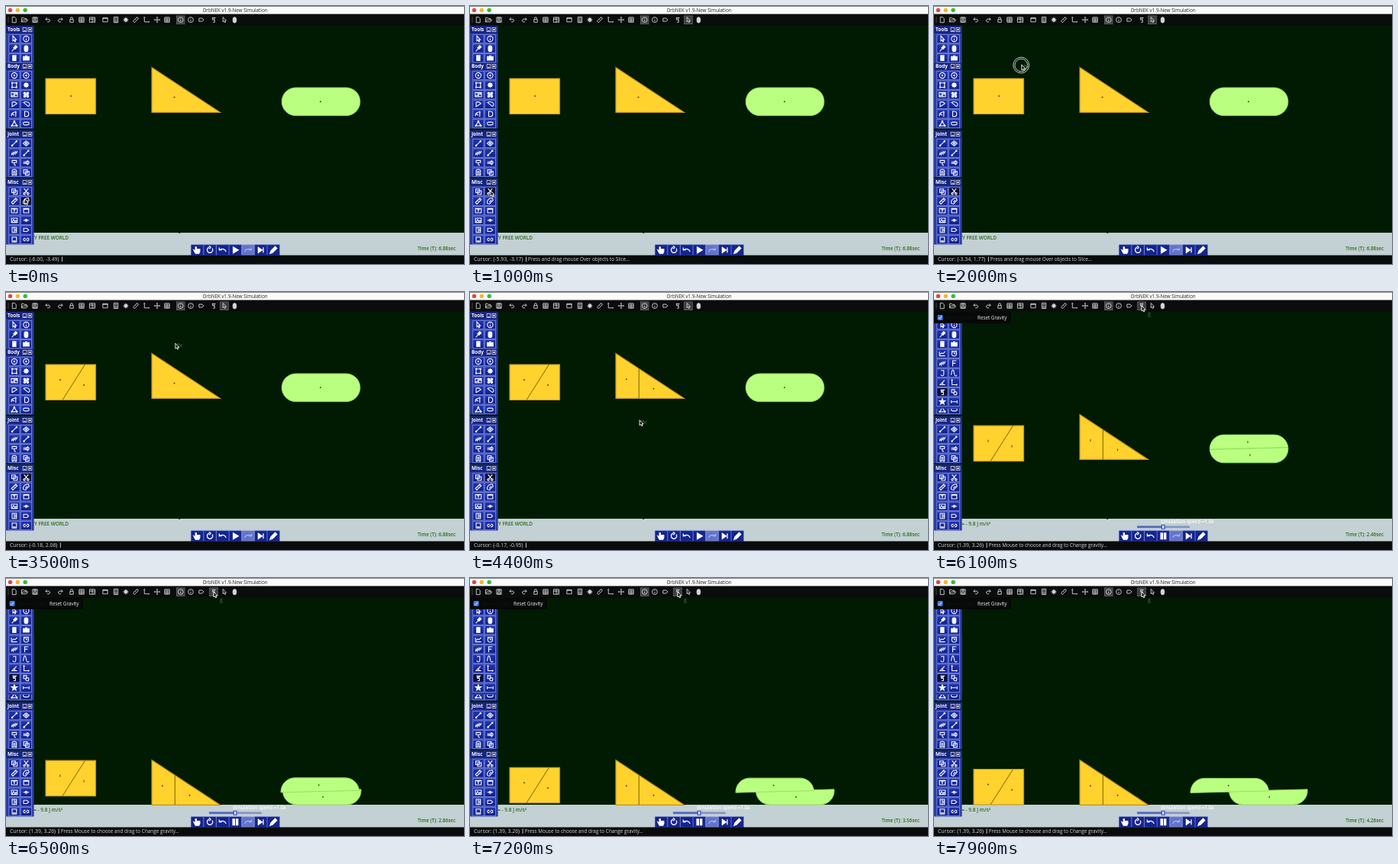
These frames come from a looping animation (600 px wide and 338 px high, 8000 ms). An HTML page with a canvas:

```html
<!DOCTYPE html>
<html lang="en">
<head>
<meta charset="utf-8">
<title>Slicing bodies</title>
<style>
  html, body { margin: 0; width: 100%; height: 100%; overflow: hidden; background: #011a02; }
  canvas { display: block; width: 600px; height: 338px; }
</style>
</head>
<body>
<canvas id="stage"></canvas>
<script>
const LOOP = 8000, STEP = 100, SCENE_CUT = 5450, DROP = 5400;
const G = 327, TAU = Math.PI * 2;
const FONT = '"Open Sans", "Noto Sans", sans-serif';
const canvas = document.getElementById('stage');
const c = canvas.getContext('2d');
const dpr = window.devicePixelRatio || 1;
canvas.width = 600 * dpr;
canvas.height = 338 * dpr;

// Icons are drawn around their own centre, about 9 px across.
const ring = (r, x = 0, y = 0) => `M${x + r} ${y}A${r} ${r} 0 1 1 ${x - r} ${y}A${r} ${r} 0 1 1 ${x + r} ${y}`;
const box = (w, h, x = 0, y = 0) => `M${x - w / 2} ${y - h / 2}h${w}v${h}h${-w}Z`;
const gear = Array.from({ length: 8 }, (_, i) => {
  const a = i * TAU / 8, x = Math.cos(a), y = Math.sin(a);
  return `M${x * 2} ${y * 2}L${x * 3.8} ${y * 3.8}`;
}).join('') + ring(2.3);
const star = Array.from({ length: 10 }, (_, i) => {
  const a = i * TAU / 10 - TAU / 4, r = i % 2 ? 1.8 : 4.2;
  return `${i ? 'L' : 'M'}${r * Math.cos(a)} ${r * Math.sin(a)}`;
}).join('') + 'Z';

const ICONS = {
  file: 'M-2.5 -4H1L3 -2V4H-2.5Z',
  open: 'M-4 3V-3H-1L0 -2H3V0M-4 3L-2 0H5L3 3Z',
  save: box(7, 7) + box(3, 2, 0, -2) + box(4, 2.4, 0, 2),
  undo: 'M-3.5 -1H1.5A2.2 2.2 0 0 1 1.5 3H-1M-1.5 -3L-3.5 -1L-1.5 1',
  redo: 'M3.5 -1H-1.5A2.2 2.2 0 0 0 -1.5 3H1M1.5 -3L3.5 -1L1.5 1',
  lock: box(5, 4, 0, 1.5) + 'M-1.7 -.5V-2A1.7 1.7 0 0 1 1.7 -2V-.5',
  table: box(7, 7) + 'M-3.5 -1H3.5M-3.5 1.5H3.5M0 -3V3.5',
  panels: box(8, 7) + 'M-4 -1H4M0 -3.5V3.5M1.5 1.5H3',
  window: box(7, 6) + 'M-3.5 -2H3.5',
  calc: box(6, 8) + 'M-2 -2H2M-2 .5H2M-2 2.5H2',
  gear,
  ruler: 'M-4 2L2 -4L4 -2L-2 4ZM-1 -1L0 0M1 -3L2 -2',
  axes: 'M-3 -4V3H4M-4 -3L-3 -4L-2 -3M3 2L4 3L3 4',
  move: 'M-4 0H4M0 -4V4M-1 -3L0 -4L1 -3M-1 3L0 4L1 3M-3 -1L-4 0L-3 1M3 -1L4 0L3 1',
  info: ring(3.8) + 'M0 -2V-1.2M0 0V2.2',
  tag: 'M-3.5 -2.2H1L3.5 0L1 2.2H-3.5Z',
  grav: 'M-2.5 -3H2.5L0 -1L1.5 0V3.5H-1M-1.5 -3V0H1',
  cursor: 'M-2 -4V3L-.5 1.7L.8 4L1.8 3.5L.8 1.2H2.8Z',
  mouse: 'M-2.5 -1A2.5 2.8 0 0 1 2.5 -1V1.5A2.5 2.8 0 0 1 -2.5 1.5ZM0 -3.7V-.5M-2.5 -.5H2.5',
  knife: 'M-3.5 4L0 0M-1 -1L2 -4L4 -2L1 1Z',
  phone: box(4.5, 7) + 'M-1 0H1M0 -1V1',
  camera: box(8, 5, 0, .5) + ring(1.5, 0, .5) + 'M-1.5 -3H1.5',
  wheel: ring(3.8) + ring(.7),
  square: box(6, 6) + box(1, 1, -3, -3) + box(1, 1, 3, -3) + box(1, 1, -3, 3) + box(1, 1, 3, 3),
  blocks: box(3.5, 6, -2.5) + box(3.5, 6, 2.5) + 'M-4 2L4 -2',
  flower: ring(1.4, -2, -2) + ring(1.4, 2, -2) + ring(1.4, -2, 2) + ring(1.4, 2, 2) + 'M-2 -2L2 2M2 -2L-2 2',
  pie: 'M-3 3V-3A6 6 0 0 1 3.5 -1Z',
  oval: 'M-3.5 -2.5A5 3.5 0 1 1 3 3Z',
  arc: 'M-4 3A5 5 0 0 1 3 -2M-4 -1L0 2M2 -4V4',
  dee: 'M-2 -3.5H0A3.5 3.5 0 0 1 0 3.5H-2Z',
  tri: 'M0 -3L3.5 3H-3.5Z' + ring(.8, 0, -3) + ring(.8, 3.5, 3) + ring(.8, -3.5, 3),
  pill: 'M-2 -2H2A2 2 0 0 1 2 2H-2A2 2 0 0 1 -2 -2Z',
  rod: 'M-3 3L3 -3' + ring(.8, -3, 3) + ring(.8, 3, -3),
  motor: 'M-4 0L0 -3.5L4 0L0 3.5Z' + ring(1.2),
  spring: 'M-4 3L-3 0L-1.5 2.5L-1 -1L1 1.5L1.2 -2L3 0L4 -3',
  rope: 'M-3 -3H3V0H-3ZM0 0V3L2 4',
  pulley: ring(2, 2, 0) + 'M-4 -1H0M-4 1H0M2 -3.5V3.5',
  magnet: 'M-3 4V-1A3 3 0 0 1 3 -1V4H1V-1H-1V4Z',
  copies: box(5, 5, -1, -1) + box(5, 5, 1.5, 1.5),
  scissors: 'M-3 -4L2 2M3 -4L-2 2' + ring(1.3, -2.5, 3) + ring(1.3, 2.5, 3),
  protractor: 'M-4 3A6 6 0 0 1 3 -4L4 -1L-1 4ZM-1 2A4 4 0 0 1 2 -1',
  text: box(8, 6) + 'M-2 -1.5H2M0 -1.5V2',
  image: box(8, 6) + 'M-3 2L-1 -1L1 2L2 0L4 2',
  slider: 'M-4 0H4' + ring(1.5),
  meter: box(6, 7) + 'M0 -3V3M1 -1H3M1 1H3',
  drawer: box(6, 7) + 'M-2 2H2',
  link: 'M-1 -1.7H-2A1.7 1.7 0 0 0 -2 1.7H-1M1 -1.7H2A1.7 1.7 0 0 1 2 1.7H1M-1.5 0H1.5',
  chart: 'M-4 -3V3H4M-3 1L-1 -1L1 0L4 -3',
  clock: ring(3.3) + 'M0 -2V0H2M-3.5 -3L-2.5 -4M3.5 -3L2.5 -4',
  force: 'M-2 4V-3.5H3M-2 0H2',
  hook: 'M-2 -3.5H2V2A2 2 0 0 1 -2 2',
  wave: 'M-4 3C-3 -6 -1 -6 0 0S3 4 4 3',
  angle: 'M3 -3L-3 3H4M0 0A4 4 0 0 1 1 3',
  shapes: box(4, 4, -1.5, -1.5) + ring(2.2, 1.5, 1.5),
  star,
  span: 'M-4 0H4M-4 -2V2M4 -2V2',
  hand: 'M-2 4L-4 0L-2 1V-3.5L-1 -3.5V-1H3V2L2 4Z',
  reload: 'M2.8 -1.8A3.3 3.3 0 1 1 -1 -3.2M-1 -5L1 -3.2L-1 -1.4',
  back: 'M4 2A4.5 4 0 0 0 -3 -.5M-4 -3V0H-1',
  forth: 'M-4 2A4.5 4 0 0 1 3 -.5M4 -3V0H1',
  play: 'M-2.5 -3.5L3.5 0L-2.5 3.5Z',
  pause: 'M-3 -3.5H-1V3.5H-3ZM1 -3.5H3V3.5H1Z',
  skip: 'M-3 -3.2L1.5 0L-3 3.2ZM3 -3.2V3.2',
  pencil: 'M-4 4L-3 1L2 -4L4 -2L-1 3Z'
};
const SOLID = /^(gear|star|camera|phone|mouse|knife|rod|flower|hand|play|pause|skip|pencil)$/;
const paths = {};
for (const k in ICONS) paths[k] = new Path2D(ICONS[k]);

const names = s => s.split(' ');
const BAR = names('file open save undo redo lock table panels window calc gear ruler axes move table info info tag grav cursor mouse');
const BAR_X = [10.5, 24, 38, 55, 71, 86, 99, 113, 130, 144, 157, 170, 184, 198, 211, 228.7, 242, 256, 272, 286, 299.5];
const TOOLS = names('cursor info knife mouse phone camera');
const MORE = names('chart clock spring force hook wave angle axes grav shapes star span');
const BODY = names('wheel wheel square gear blocks flower pie oval arc dee tri pill');
const JOINT = names('rod motor spring rod rope pulley magnet copies');
const MISC = names('copies scissors ruler protractor text window image slider meter tag drawer link');

// Pointer: time, x, y of the tip.
const ROUTE = [
  [0, 24.6, 252.6], [400, 24.6, 252.6], [700, 27, 242], [1000, 27, 242],
  [1800, 114.8, 76.9], [2100, 114.8, 76.9], [2700, 66, 156], [2900, 66, 156],
  [3400, 221.9, 67.2], [3600, 221.9, 67.2], [4250, 222.2, 167.7], [4450, 222.2, 167.7],
  [4900, 345, 126.4], [5000, 345, 126.4], [5350, 481, 123.1]
];
const PRESSES = [[1900, 2800], [3600, 4300], [5000, 5400]];

function rect(x, y, w, h, fill) { c.fillStyle = fill; c.fillRect(x, y, w, h); }

function line(x1, y1, x2, y2, color, w = 1) {
  c.strokeStyle = color;
  c.lineWidth = w;
  c.beginPath();
  c.moveTo(x1, y1);
  c.lineTo(x2, y2);
  c.stroke();
}

function disc(x, y, r, fill) {
  c.fillStyle = fill;
  c.beginPath();
  c.arc(x, y, r, 0, TAU);
  c.fill();
}

function label(s, x, y, size, color, align = 'left', weight = 400) {
  c.font = `${weight} ${size}px ${FONT}`;
  c.textAlign = align;
  c.fillStyle = color;
  c.fillText(s, x, y);
  return c.measureText(s).width;
}

function icon(name, x, y, color, k = 1, w = 1) {
  c.save();
  c.translate(x, y);
  c.scale(k, k);
  c.strokeStyle = c.fillStyle = color;
  c.lineWidth = w;
  if (SOLID.test(name)) c.fill(paths[name]);
  c.stroke(paths[name]);
  c.restore();
}

function pointer(t) {
  for (let i = 1; i < ROUTE.length; i++) {
    const [t0, x0, y0] = ROUTE[i - 1], [t1, x1, y1] = ROUTE[i];
    if (t < t1) {
      const p = (t - t0) / (t1 - t0), k = p * p * (3 - 2 * p);
      return [x0 + (x1 - x0) * k, y0 + (y1 - y0) * k];
    }
  }
  return ROUTE[ROUTE.length - 1].slice(1);
}

// Distance fallen after s seconds, with bounces of restitution e.
function fall(s, h, e) {
  if (s <= 0) return 0;
  const land = Math.sqrt(2 * h / G);
  if (s < land) return G * s * s / 2;
  s -= land;
  for (let v = G * land * e; v > 4; v *= e) {
    const air = 2 * v / G;
    if (s < air) return h - v * s + G * s * s / 2;
    s -= air;
  }
  return h;
}

function poly(pts, fill, stroke) {
  c.beginPath();
  pts.forEach(([x, y]) => c.lineTo(x, y));
  c.closePath();
  c.fillStyle = fill;
  c.fill();
  c.strokeStyle = stroke;
  c.lineWidth = 1.2;
  c.stroke();
}

function dots(pts, moving) {
  const w = moving ? 1 : 1.5, h = moving ? 3 : 1.5;
  for (const [x, y] of pts) rect(x - w / 2, y - h / 2, w, h, moving ? '#4a4a18' : '#1c2410');
}

function pill() {
  c.beginPath();
  c.roundRect(361.3, 107, 102.6, 36.6, 18.3);
  c.fillStyle = '#bbff80';
  c.fill();
  c.strokeStyle = '#8fdc62';
  c.lineWidth = 1;
  c.stroke();
}

function halfPill(dx, dy, edge, dot, moving) {
  c.save();
  c.translate(dx, dy);
  c.save();
  c.beginPath();
  [[350, 126.3], [475, 123.2], [475, edge], [350, edge]].forEach(([x, y]) => c.lineTo(x, y));
  c.clip();
  pill();
  c.restore();
  line(361.3, 126, 463.9, 123.5, '#8fdc62', .9);
  dots([dot], moving);
  c.restore();
}

function bodies(t) {
  const s = (t - DROP) / 1000, gold = '#ffd22e', rim = '#bd9420', cut = '#80620c';
  const airborne = s > 0 && s < .97;

  c.save();
  c.translate(0, fall(s, 155.5, .35));
  poly([[52, 95], [117.5, 95], [117.5, 141.5], [52, 141.5]], gold, rim);
  if (t >= 2800) {
    line(103.5, 95, 74, 141.5, cut);
    dots([[71, 115], [102, 122]], s > 0 && s < 1.6);
  } else dots([[85, 118]]);
  c.restore();

  c.save();
  c.translate(0, fall(s, 158, 0));
  poly([[191, 80.5], [280.5, 139.3], [191, 139.3]], gold, rim);
  if (t >= 4300) {
    line(221.3, 100.5, 221.3, 139.3, cut);
    dots([[205, 114.3], [240.5, 126.7]], airborne);
  } else dots([[220.5, 119.5]]);
  c.restore();

  if (t >= 5400) {
    const slide = Math.max(0, s - 1.03) * 17.2;
    halfPill(slide, fall(s, 153.4, 0), 150, [414, 133.5], airborne);
    halfPill(-slide, fall(s, 154.8, 0) + slide * .025, 100, [411, 116.5], airborne);
  } else {
    pill();
    dots([[412, 125.2]]);
  }
}

function cell(name, x, y, chosen) {
  rect(x - 7.6, y - 6.1, 15.2, 12.2, '#7488dc');
  const g = c.createLinearGradient(0, y - 6, 0, y + 6);
  g.addColorStop(0, chosen ? '#060a30' : '#2136b2');
  g.addColorStop(1, chosen ? '#0a1148' : '#121e88');
  rect(x - 6.7, y - 5.2, 13.4, 10.4, g);
  icon(name, x, y, '#f6f8ff', .95, 1.15);
}

function palette(title, y, list, chosen = -1, foot = 6.5) {
  const rows = list.length / 2;
  rect(0, y - 5.2, 36.6, 17.2 + 12.6 * (rows - 1) + foot, '#2c3d9f');
  rect(0, y - 4.7, 36, 9.4, '#17247f');
  label(title, 2, y + 2.2, 6.4, '#fff', 'left', 700);
  for (const x of [24.5, 31.5]) {
    rect(x - 2.8, y - 3, 5.6, 6, '#d5daf2');
    rect(x - 2, y - 2.2, 4, 4.4, '#18246f');
  }
  rect(23.3, y + .8, 2.4, .9, '#fff');
  rect(30.5, y - 1, 2, 2, '#fff');
  list.forEach((n, i) => cell(n, i % 2 ? 26.4 : 10.9, y + 12 + 12.6 * (i >> 1), i === chosen));
}

function controls(running) {
  const list = names('hand reload back play forth skip pencil');
  if (running) {
    list[3] = 'pause';
    rect(266, 306.5, 69, 2.6, '#8292c9');
    rect(266, 306.5, 34, 2.6, '#5268bd');
    rect(297.7, 304.8, 5, 6, '#3a51b5');
    rect(299, 305.8, 2.4, 4, '#dfe5ff');
    label('simulation speed =1.0x', 297, 302.6, 6.3, '#fff', 'left', 600);
  }
  list.forEach((n, i) => {
    const x = 250.5 + 16.65 * i, off = n === 'forth';
    rect(x - 8.3, 312.5, 16.6, 14.5, off ? '#8492d8' : '#4054bd');
    rect(x - 7.6, 313.2, 15.2, 13, off ? '#6474cb' : '#15248f');
    icon(n, x, 319.7, off ? '#a7b3ea' : '#fff', 1.1, 1.2);
  });
}

function titleBar() {
  rect(0, 0, 600, 11, '#0b0c0c');
  rect(0, .5, 600, 10, '#fbfbfb');
  disc(5.5, 5.4, 2.7, '#e8453f');
  disc(15.3, 5.4, 2.7, '#f5b52c');
  disc(25.2, 5.4, 2.7, '#2ac040');
  label('OrbNEK v1.9-New Simulation', 300, 8, 6.3, '#222', 'center');
}

function toolbar(active) {
  rect(0, 11, 600, 14.5, '#0b0c0c');
  rect(2.5, 14, 1, 8, '#444');
  BAR.forEach((n, i) => {
    if (i === 15 || n === active) {
      rect(BAR_X[i] - 5.7, 12.5, 11.4, 11.5, '#6b6e6e');
      rect(BAR_X[i] - 5, 13.2, 10, 10.1, '#3b3e3e');
    }
    icon(n, BAR_X[i], 18.1, '#d4d6d6', .9, 1);
  });
}

function popup() {
  rect(0, 25.5, 101, 15.5, '#060907');
  label('Show Vector', 15, 36, 6.2, '#131614');
  c.fillStyle = '#4377ee';
  c.beginPath();
  c.roundRect(4.6, 30, 7, 7, 1.4);
  c.fill();
  line(6.2, 33.6, 7.6, 35.2, '#fff', .9);
  line(7.6, 35.2, 10, 31.6, '#fff', .9);
  label('Reset Gravity', 57, 36, 6.3, '#f0f2f0');
}

function status(u, v, msg) {
  rect(0, 326.5, 600, 11.5, '#0a0c0b');
  const w = label(`Cursor: (${u.toFixed(2)}, ${v.toFixed(2)})`, 5, 334, 6.9, '#d4d7d6');
  rect(8.5 + w, 328.5, .9, 6.5, '#d8dada');
  label(msg, 11.5 + w, 334, 6.4, '#d4d7d6');
}

function arrow(x, y) {
  c.save();
  c.translate(x + 2, y + 4);
  c.fillStyle = '#0a0a0a';
  c.strokeStyle = '#fff';
  c.lineWidth = .9;
  c.fill(paths.cursor);
  c.stroke(paths.cursor);
  c.restore();
}

function draw(t) {
  const running = t >= SCENE_CUT;
  c.setTransform(dpr, 0, 0, dpr, 0, 0);
  rect(0, 0, 600, 338, '#011a02');
  rect(0, 297, 600, 30, '#c3d0d4');
  rect(226.3, 296, 1.8, 1.8, '#111');
  bodies(t);

  const green = '#2a6c14';
  if (running) label('g = - 9.8 ĵ m/s²', 74, 305.5, 6.5, green, 'right', 600);
  else label('GRAVITY FREE WORLD', 82, 305.5, 6.4, green, 'right', 600);
  const clock = running ? (t - 3640) / 1000 : 6.88;
  label(`Time (T): ${clock.toFixed(2)}sec`, 589, 320.3, 6.3, green, 'right', 600);

  const sliceOn = t >= 700 && !running;
  palette('Body', 79, BODY);
  palette('Joint', 168, JOINT);
  palette('Misc', 231, MISC, sliceOn ? 1 : running ? -1 : t < 400 ? 3 : -1);
  if (running) palette('Tools', 31, TOOLS.concat(MORE), 14, 9);
  else palette('Tools', 31, TOOLS);
  controls(running);
  titleBar();
  toolbar(running ? 'grav' : sliceOn ? 'cursor' : '');

  if (running) {
    popup();
    status(1.39, 3.26, 'Press Mouse to choose and drag to Change gravity...');
    label('g', 280, 31, 7, '#4f7350');
    arrow(272, 18);
    return;
  }
  const [x, y] = pointer(t);
  status((x - 228) / 33.9, (136 - y) / 33.4,
    sliceOn && t < 2800 ? 'Press and drag mouse Over objects to Slice...' : '');
  if (sliceOn && x > 37) {
    c.save();
    c.translate(x + 6.5, y + 3);
    c.rotate(TAU / 4);
    icon('scissors', 0, 0, '#4c7350', .75, .9);
    c.restore();
  }
  if (PRESSES.some(([a, b]) => t >= a && t < b)) {
    c.strokeStyle = '#d9ded9';
    c.lineWidth = .9;
    for (const r of [8.3, 10.4]) {
      c.beginPath();
      c.arc(x - .6, y + .6, r, 0, TAU);
      c.stroke();
    }
  }
  arrow(x, y);
}

function frame() {
  const t = (performance.now() + 8) % LOOP;
  draw(Math.floor(t / STEP) * STEP);
  requestAnimationFrame(frame);
}
frame();
</script>
</body>
</html>
```
